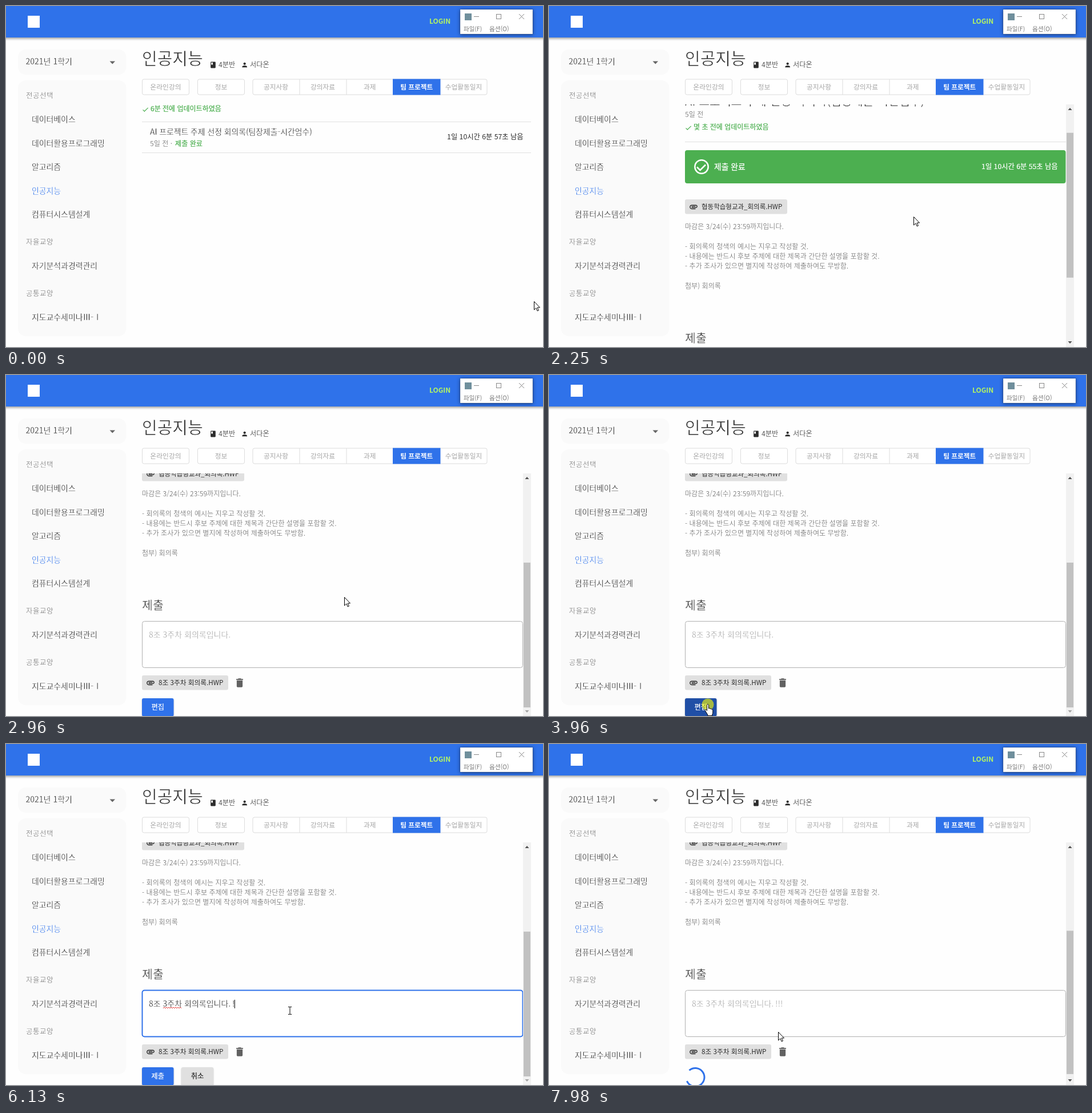
Recreate the animation shown at these times as an HTML page. Size 940x596 px, loop 8 s.

```html
<!DOCTYPE html>
<html lang="ko">
<head>
<meta charset="utf-8">
<title>인공지능</title>
<style>
  html, body { margin: 0; width: 100%; height: 100%; overflow: hidden; background: #fefefe; }
  svg { display: block; width: 100vw; height: 100vh; }
  text { font-family: 'Noto Sans CJK KR', 'Noto Sans CJK', 'Noto Sans KR', 'Noto Sans', sans-serif; white-space: pre; }
  .bar { filter: drop-shadow(0 2px 2px rgba(0,0,0,.4)); }
  .win { filter: drop-shadow(0 1px 3px rgba(0,0,0,.5)); }
  .btn { filter: drop-shadow(0 1px 1px rgba(0,0,0,.25)); }
</style>
</head>
<body>
<svg id="stage" viewBox="0 0 940 596" xmlns="http://www.w3.org/2000/svg"></svg>
<script>
const LOOP = 8000, STEP = 220 / 3, BLUE = '#2f72ea', PRESSED = '#204fa6', GREEN = '#4caf50';
const INK = '#2c2c2c', FAINT = '#a6a6a6', PAPER = '#fdfdfd';
const VIEW = 424, TRACK = 394;

const ICON = {
  book: 'M18 2H6c-1.1 0-2 .9-2 2v16c0 1.1.9 2 2 2h12c1.1 0 2-.9 2-2V4c0-1.1-.9-2-2-2zM6 4h5v8l-2.5-1.5L6 12V4z',
  person: 'M12 12c2.2 0 4-1.8 4-4s-1.8-4-4-4-4 1.8-4 4 1.8 4 4 4zm0 2c-2.7 0-8 1.3-8 4v2h16v-2c0-2.7-5.3-4-8-4z',
  check: 'M9 16.2L4.8 12l-1.4 1.4L9 19 21 7l-1.4-1.4z',
  back: 'M20 11H7.8l5.6-5.6L12 4l-8 8 8 8 1.4-1.4L7.8 13H20z',
  clip: 'M2 12.5C2 9.5 4.5 7 7.5 7H18c2.2 0 4 1.8 4 4s-1.8 4-4 4H9.5C8.1 15 7 13.9 7 12.5S8.1 10 9.5 10H17v2H9.4c-.5 0-.5 1 0 1H18c1.1 0 2-.9 2-2s-.9-2-2-2H7.5C5.6 9 4 10.6 4 12.5S5.6 16 7.5 16H17v2H7.5C4.5 18 2 15.5 2 12.5z',
  trash: 'M6 19c0 1.1.9 2 2 2h8c1.1 0 2-.9 2-2V7H6zM19 4h-3.5l-1-1h-5l-1 1H5v2h14z'
};

// A thin outline in paper or ink colour gives the light and medium weights.
const outline = (weight, size, fill) =>
  weight === 300 || weight === 500 ? `stroke="${weight === 300 ? PAPER : fill}" stroke-width="${(size * .02).toFixed(2)}"` : '';
// Text is placed by the vertical centre of its glyphs.
const text = (str, x, cy, size, fill = INK, weight = 300, more = '') =>
  `<text x="${x}" y="${(cy + size * .37).toFixed(2)}" font-size="${size}" fill="${fill}" font-weight="${weight === 700 ? 700 : 400}" ${outline(weight, size, fill)} ${more}>${str}</text>`;
const mid = 'text-anchor="middle"', end = 'text-anchor="end"';
const rect = (x, y, w, h, fill, rx = 0, more = '') =>
  `<rect x="${x}" y="${y}" width="${w}" height="${h}" fill="${fill}" rx="${rx}" ${more}/>`;
const icon = (name, cx, cy, size, fill) =>
  `<path d="${ICON[name]}" fill="${fill}" transform="translate(${cx - size / 2} ${cy - size / 2}) scale(${size / 24})"/>`;
const line = (x1, y1, x2, y2, stroke = '#e0e0e0') =>
  `<path d="M${x1} ${y1}L${x2} ${y2}" stroke="${stroke}"/>`;
const group = (id, body) => `<g id="${id}">${body}</g>`;

function header() {
  return rect(-5, -5, 950, 60, BLUE, 0, 'class="bar"')
    + rect(38, 17, 21, 21, '#fff')
    + text('LOGIN', 741, 27, 12, '#b4f562', 700)
    + rect(795, 6, 127, 43, '#fff', 0, 'class="win" stroke="#000" stroke-opacity=".3" stroke-width=".6"')
    + rect(803, 13, 12, 12, '#6f8f9c')
    + line(819, 18.5, 828, 18.5, '#888')
    + rect(858.5, 14.5, 8, 8, 'none', 0, 'stroke="#888"')
    + '<path d="M898 14l9 9M907 14l-9 9" stroke="#888"/>'
    + text('파일(F)', 801, 40, 10.5, '#555')
    + text('옵션(O)', 846, 40, 10.6, '#555');
}

function sidebar() {
  const heads = [['전공선택', 156.5], ['자율교양', 412], ['공통교양', 502.5]];
  const items = [['데이터베이스', 197.5], ['데이터활용프로그래밍', 239.5], ['알고리즘', 281], ['인공지능', 322.5],
    ['컴퓨터시스템설계', 364], ['자기분석과경력관리', 453.5], ['지도교수세미나Ⅲ-Ⅰ', 543.5]];
  return rect(21, 76, 189.5, 44, '#fafafa', 14) + rect(21, 130, 189.5, 447, '#fafafa', 14)
    + text('2021년 1학기', 34.5, 97, 14)
    + '<path d="M181.5 96.5h9.6l-4.8 5z" fill="#666"/>'
    + heads.map(([s, y]) => text(s, 35, y, 12.5, '#777', 300, 'letter-spacing=".5"')).join('')
    + items.map(([s, y]) => text(s, 45, y, 13.9, s === '인공지능' ? BLUE : INK)).join('');
}

function tabs() {
  const box = 'stroke="#dcdcdc"';
  const names = ['공지사항', '강의자료', '과제', '팀 프로젝트', '수업활동일지'];
  let out = rect(238.5, 128, 82, 27, '#fff', 3, box) + text('온라인강의', 279.5, 141.5, 11.8, FAINT, 400, mid)
    + rect(335.5, 128, 82, 27, '#fff', 3, box) + text('정보', 376.5, 141.5, 11.7, FAINT, 400, mid)
    + rect(432, 128, 410, 27, '#fff', 3, box)
    + line(514, 128, 514, 155, '#dcdcdc') + line(596, 128, 596, 155, '#dcdcdc')
    + rect(677, 127.5, 83.5, 28, BLUE);
  names.forEach((s, i) => {
    const on = i === 3;
    out += text(s, 472.5 + 82.1 * i, 141.5, 11.7, on ? '#fff' : FAINT, on ? 700 : 400, mid);
  });
  return out;
}

function title() {
  return text('인공지능', 238, 92.5, 29)
    + icon('book', 362.5, 103, 13, INK) + text('4분반', 372, 102.5, 12.2)
    + icon('person', 417.7, 103, 13, INK) + text('서다온', 427, 102.5, 12.2);
}

function listPage() {
  return icon('check', 244, 181, 13.5, GREEN) + text('6분 전에 업데이트하였음', 253, 180, 12, GREEN, 500)
    + line(238, 202.5, 919, 202.5) + line(238, 256.5, 919, 256.5)
    + text('AI 프로젝트 주제 선정 회의록(팀장제출-시간엄수)', 252, 219.5, 13.83)
    + text('5일 전 ·', 252, 240.5, 12.1, '#6c6c6c')
    + text('제출 완료', 296, 240.5, 12.1, GREEN, 500)
    + text('', 905.5, 228.5, 12.25, INK, 400, end + ' id="leftA"');
}

const chip = (y, w, name, size) => rect(238, y, w, 25.5, '#e0e0e0', 3)
  + icon('clip', 253, y + 13, 16.5, INK) + text(name, 267, y + 12.5, size, INK, 400);

const button = (id, x, w, label, fill, ink) => group(id,
  rect(x, 801, w, 31.5, fill, 3, 'class="btn"') + text(label, x + w / 2, 816, 12.2, ink, 500, mid));

function detailPage() {
  const body = ['마감은 3/24(수) 23:59까지입니다.', '', '- 회의록의 청색의 예시는 지우고 작성할 것.',
    '- 내용에는 반드시 후보 주제에 대한 제목과 간단한 설명을 포함할 것.',
    '- 추가 조사가 있으면 별지에 작성하여 제출하여도 무방함.', '', '첨부) 회의록'];
  return rect(238, 172, 80.5, 26, BLUE, 3) + icon('back', 253.5, 185, 16, '#fff')
    + text('이전으로', 267, 184.5, 11.7, '#fff', 700)
    + text('AI 프로젝트 주제 선정 회의록(팀장제출-시간엄수)', 238, 224, 20.45)
    + text('5일 전', 238, 247.5, 12.1, '#6c6c6c')
    + icon('check', 244, 271, 13.5, GREEN) + text('몇 초 전에 업데이트하였음', 253, 270, 12, GREEN, 500)
    + line(238, 295.5, 905, 295.5)
    + rect(238, 310, 666.5, 58, GREEN, 4)
    + '<g fill="none" stroke="#fff" stroke-width="2.5"><circle cx="267" cy="339" r="11.7"/><path d="M259 339.5l5.5 5.5 9.5-9.5"/></g>'
    + text('제출 완료', 289, 339, 13.8, '#fff', 500)
    + text('', 890.5, 338.5, 12.25, '#fff', 500, end + ' id="leftB"')
    + chip(396, 179, '협동학습형교과_회의록.HWP', 11.5)
    + body.map((s, i) => s && text(s, 238, 443.5 + 17.3 * i, 12.05, '#6c6c6c')).join('')
    + text('제출', 238, 638, 20.6)
    + rect(238.5, 666.5, 666, 81, '#fff', 4, 'id="field"')
    + group('entry', text('8조 3주차 회의록입니다.', 250, 690, 14, 'inherit')
      + text('', 396, 690, 14, 'inherit', 300, 'id="bangs"'))
    + `<path id="squiggle" d="M275 698${'l2-2 2 2'.repeat(8)}" fill="none" stroke="#e53935"/>`
    + rect(0, 683, 1, 15, '#000', 0, 'id="caret"')
    + chip(761, 151, '8조 3주차 회의록.HWP', 11.7)
    + icon('trash', 409, 774, 20.5, '#616161')
    + button('edit', 238, 55.5, '편집', BLUE, '#fff')
    + button('send', 238, 55.5, '제출', BLUE, '#fff')
    + button('cancel', 307, 56, '취소', '#e0e0e0', INK)
    + `<circle id="spin" cx="256" cy="818.5" r="16" fill="none" stroke="${BLUE}" stroke-width="3" pathLength="125.6"/>`;
}

function cursors() {
  const shape = 'fill="#fff" stroke="#000" stroke-linejoin="round"';
  return group('cursor',
    `<path id="arrow" d="M.5.5v14.5l3.4-3.2 2.3 5.2 2.2-1-2.3-5h4.4z" ${shape}/>`
    + `<path id="hand" d="M-1.5 1c0-2 3-2 3 0v6c1-1 2.6-.6 2.8.6 1-.8 2.3-.3 2.5.9 1-.5 2 0 2 1.5v4c0 2-1.4 3-1.4 5.5h-7.4c0-2-1-3-2-4.5l-2.5-4.3c-1-2 .8-2.8 2-1.4l1 1.4z" ${shape}/>`
    + '<path id="beam" d="M-3-6.5h2.5l.5.5.5-.5H3M0-6V6M-3 6.5h2.5L0 6l.5.5H3" fill="none" stroke="#000"/>');
}

document.getElementById('stage').innerHTML =
  '<clipPath id="view"><rect x="230" y="172" width="675.5" height="424"/></clipPath>'
  + rect(0, 0, 940, 596, '#fefefe') + sidebar() + title() + tabs() + header()
  + group('list', listPage())
  + group('detail', `<g clip-path="url(#view)">${group('scroll', detailPage())}</g>`
    + rect(905, 172, 14, 424, '#f1f1f1')
    + rect(906, 187, 12, 253, '#c1c1c1', 0, 'id="thumb"')
    + '<path id="up" d="M908.5 182h7l-3.5-4z"/><path id="down" d="M908.5 586h7l-3.5 4z"/>')
  + '<circle id="dot" r="10.5" fill="#ff0" fill-opacity=".6"/>'
  + cursors();

const el = {};
document.querySelectorAll('[id]').forEach(n => el[n.id] = n);
const set = (n, attrs) => { for (const k in attrs) n.setAttribute(k, attrs[k]); };
const show = (n, on) => n.setAttribute('display', on ? 'inline' : 'none');
const within = (t, a, b) => t >= a && t < b;
const smooth = p => p * p * (3 - 2 * p);
const straight = p => p;
// Scrolling, pointer and spinner move in even steps, as a screen recorder sees them.
const stepped = t => Math.floor((t - 49) / STEP) * STEP + 50;

// Keys are [time, ...values].
function track(keys, t, ease) {
  let i = 0;
  while (i < keys.length - 1 && keys[i + 1][0] <= t) i++;
  const a = keys[i], b = keys[i + 1];
  if (!b || t < a[0]) return a.slice(1);
  const p = ease((t - a[0]) / (b[0] - a[0]));
  return a.slice(1).map((v, k) => v + (b[k + 1] - v) * p);
}

const MOUSE = [[40, 924, 516], [830, 301, 225], [1000, 301, 225], [1365, 649, 245], [1450, 649, 245],
  [1570, 678, 285], [1720, 639, 352], [1880, 638, 368], [2690, 638, 368], [3490, 390, 477],
  [3880, 278, 576], [4120, 278, 576], [4540, 497, 466], [6480, 497, 466], [7060, 268, 577],
  [7270, 268, 577], [7930, 401, 503]];
const SCROLL = [[2100, 0], [2250, 58], [2470, 179], [2620, 236]];
const CLICKS = [[910, 1010], [3920, 4060], [4570, 4680], [7110, 7210]];
const OPEN = 1000, EDIT = 4060, FOCUS = 4580, SEND = 7250;

function drawSpinner(t) {
  const turn = Math.max(0, t - SEND) / 1400 % 1;
  const half = turn < .5;
  const p = smooth(half ? turn * 2 : turn * 2 - 1);
  set(el.spin, {
    'stroke-dasharray': `${half ? 1 + 99 * p : 100} 200`,
    'stroke-dashoffset': half ? -15 * p : -15 - 110 * p,
    transform: `rotate(${360 * turn} 256 818.5)`
  });
}

function drawField(t, editing) {
  const focus = within(t, FOCUS, 7130);
  const typed = [6130, 6280, 6450].filter(k => t >= k).length;
  const lastKey = [FOCUS, 5810, 6130, 6280, 6450].filter(k => t >= k).pop();
  set(el.field, { stroke: focus ? BLUE : '#b0b0b0', 'stroke-width': focus ? 2 : 1 });
  set(el.entry, { fill: editing ? INK : FAINT });
  el.bangs.textContent = '!'.repeat(typed);
  show(el.squiggle, within(t, FOCUS, SEND));
  show(el.caret, focus && Math.floor((t - lastKey) / 535) % 2 === 0);
  set(el.caret, { x: t < 5810 ? 392 : 395.5 + 4.3 * typed });
}

function drawCursor(t, editing) {
  const [x, y] = track(MOUSE, stepped(t), smooth).map(Math.round);
  const overButton = t > 3000 && t < SEND && y >= 565 && x < 293.5;
  const overRow = t < OPEN && y > 203 && y < 256;
  const kind = overButton || overRow ? 'hand' : editing && within(y, 430, 511) ? 'beam' : 'arrow';
  for (const k of ['arrow', 'hand', 'beam']) show(el[k], k === kind);
  set(el.cursor, { transform: `translate(${x} ${y})` });
  set(el.dot, { cx: x, cy: y });
  show(el.dot, CLICKS.some(([a, b]) => within(t, a, b)));
}

function draw(t) {
  const editing = within(t, EDIT, SEND), sending = t >= SEND;
  show(el.list, t < OPEN);
  show(el.detail, t >= OPEN);

  const left = `1일 10시간 6분 ${57 - Math.floor((t + 50) / 1000)}초 남음`;
  el.leftA.textContent = el.leftB.textContent = left;

  const y = Math.round(track(SCROLL, stepped(t), straight)[0]);
  const height = sending ? 667 : 660;
  set(el.scroll, { transform: `translate(0 ${-y})` });
  set(el.thumb, { y: 187 + TRACK * y / height, height: TRACK * VIEW / height });
  set(el.up, { fill: y > 0 ? '#505050' : '#a3a3a3' });
  set(el.down, { fill: y < height - VIEW ? '#505050' : '#a3a3a3' });

  drawField(t, editing);
  show(el.edit, t < EDIT);
  show(el.send, editing);
  show(el.cancel, editing);
  show(el.spin, sending);
  el.edit.firstChild.setAttribute('fill', t >= 3900 ? PRESSED : BLUE);
  el.send.firstChild.setAttribute('fill', t < 4200 || t >= 7110 ? PRESSED : BLUE);
  drawSpinner(stepped(t));
  drawCursor(t, editing);
}

const start = performance.now();
function tick() {
  draw((performance.now() - start) % LOOP);
  requestAnimationFrame(tick);
}
tick();
</script>
</body>
</html>
```
